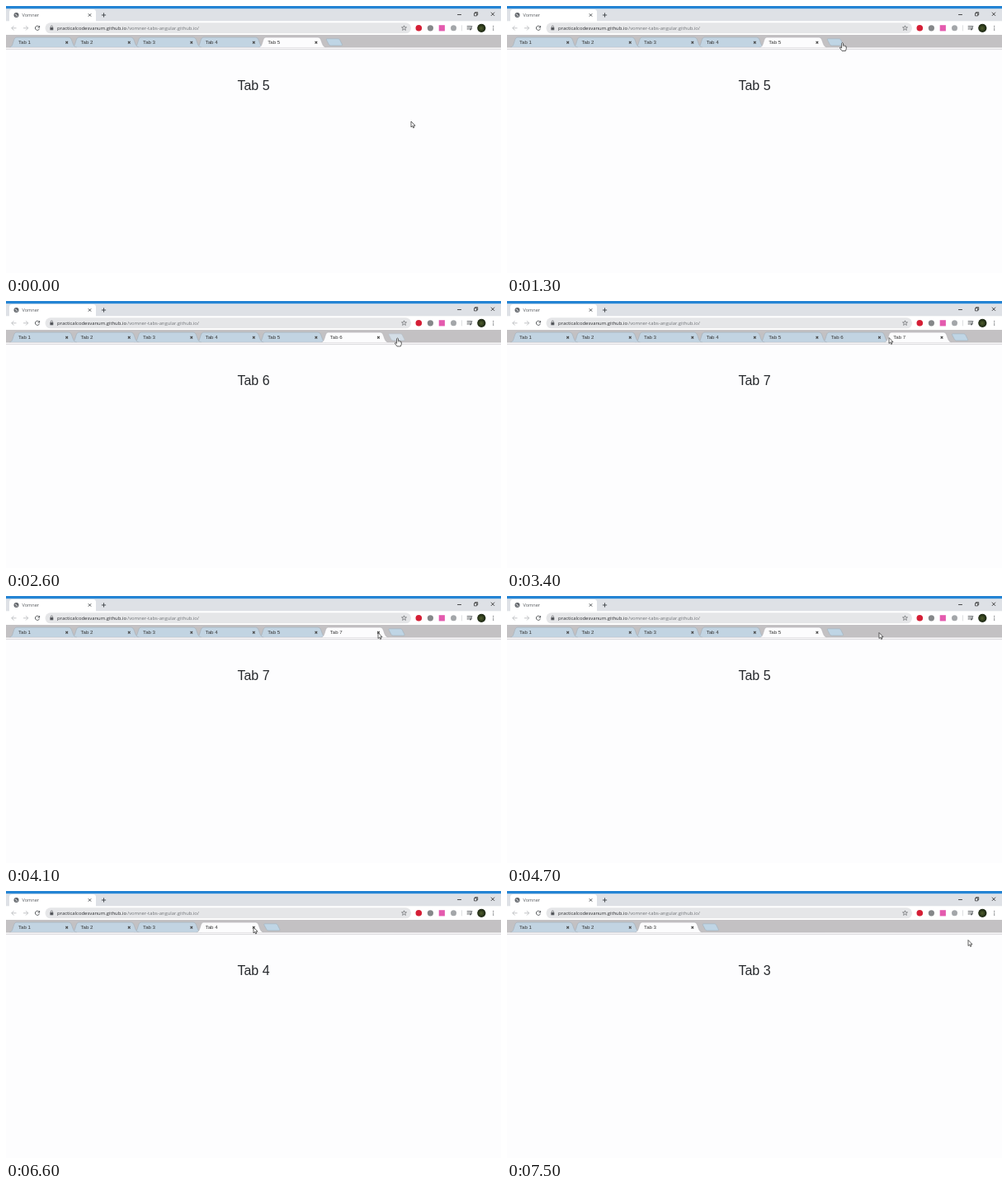
An HTML page with a canvas that plays this animation: 600x324 px, repeating every 7600 ms.

```html
<!DOCTYPE html>
<html lang="en">
<head>
<meta charset="utf-8">
<title>Dynamic tabs</title>
<style>
  html, body { margin: 0; width: 100%; height: 100%; overflow: hidden; background: #fdfdfe; }
  canvas { display: block; }
</style>
</head>
<body>
<canvas id="stage" width="600" height="324"></canvas>
<script>
const ctx = document.getElementById('stage').getContext('2d');
const LOOP = 7600, STEP = 100, PITCH = 75.55;
const UI = '"Open Sans", sans-serif';
const ARIAL = '"Liberation Sans", Arial, sans-serif';

// Open tabs from a given time on; the last one is active.
const tabStates = [
  [0, '12345'], [1600, '123456'], [3000, '1234567'],
  [4000, '123457'], [4500, '12345'], [5400, '1234'], [6700, '123']
];

// Pointer keys: time, x, y
const pointerPath = [
  [0, 491, 140], [100, 491, 140], [300, 461, 67], [500, 461, 67],
  [700, 413, 57], [800, 413, 57], [1200, 406.5, 44.5], [1800, 406.5, 44.5],
  [2500, 474.5, 45], [3000, 474.5, 45], [3400, 463, 44.5], [3600, 451, 44.5],
  [4700, 451, 44.5], [5200, 376, 44], [5500, 376, 44], [5900, 322.5, 45],
  [6000, 322.5, 45], [6400, 300, 44], [6700, 300, 44], [7300, 559, 59.5], [LOOP, 559, 59.5]
];
const handTimes = [[1000, 1600], [2300, 3000], [5700, 6200]];
const hoverTimes = [[2400, 3000], [5800, 6100]];

const within = (ranges, t) => ranges.some(([a, b]) => t >= a && t < b);

function pointerAt(t) {
  const i = pointerPath.findIndex(key => key[0] > t);
  const [t0, x0, y0] = pointerPath[i - 1], [t1, x1, y1] = pointerPath[i];
  const k = (t - t0) / (t1 - t0);
  return [x0 + (x1 - x0) * k, y0 + (y1 - y0) * k];
}

function rect(x, y, w, h, color) {
  ctx.fillStyle = color;
  ctx.fillRect(x, y, w, h);
}

function pill(x, y, w, h, r, color) {
  ctx.fillStyle = color;
  ctx.beginPath();
  ctx.roundRect(x, y, w, h, r);
  ctx.fill();
}

function disc(x, y, r, color) {
  ctx.fillStyle = color;
  ctx.beginPath();
  ctx.arc(x, y, r, 0, Math.PI * 2);
  ctx.fill();
}

function line(d, color, width = 0.8, x = 0, y = 0) {
  ctx.save();
  ctx.translate(x, y);
  ctx.strokeStyle = color;
  ctx.lineWidth = width;
  ctx.stroke(new Path2D(d));
  ctx.restore();
}

function shape(d, x, y, fill, stroke, width = 0.7) {
  ctx.save();
  ctx.translate(x, y);
  const path = new Path2D(d);
  ctx.fillStyle = fill;
  ctx.fill(path);
  ctx.strokeStyle = stroke;
  ctx.lineWidth = width;
  ctx.lineJoin = 'round';
  ctx.stroke(path);
  ctx.restore();
}

function text(value, x, y, font, color, align = 'left') {
  ctx.font = font;
  ctx.fillStyle = color;
  ctx.textAlign = align;
  ctx.fillText(value, x, y);
}

const cross = (x, y, r, color, width) =>
  line(`M${-r} ${-r}L${r} ${r}M${r} ${-r}L${-r} ${r}`, color, width, x, y);

function drawTitleBar() {
  rect(0, 0, 600, 3.5, '#2484d4');
  rect(0, 3.5, 600, 15, '#dee1e6');
  pill(4, 4, 105, 18, 3.5, '#fff');
  disc(12.5, 11, 3, '#5f6368');
  line('M-1.8 -.8Q0 -1.6 .2 .2T1.8 1M-.8 1.7L-.2 .8', '#fff', 0.7, 12.5, 11);
  text('Vomner', 19.5, 13, '5.6px ' + UI, '#55585c');
  cross(101.5, 11, 1.7, '#3c4043', 0.9);
  line('M-2.6 0H2.6M0 -2.6V2.6', '#3c4043', 0.9, 118.5, 11);
  line('M-2.4 0H2.4', '#222', 0.8, 549.5, 10.5);
  line('M-2 -1H1.2V2.2H-2ZM-1 -1V-2.1H2.2V1.1H1.2', '#222', 0.7, 569.5, 9.7);
  cross(590, 9.8, 2.1, '#222', 0.8);
}

function drawToolbar() {
  rect(0, 18.5, 600, 16.5, '#fff');
  line('M3 0H-2.7M0 -2.7L-2.7 0L0 2.7', '#b4b6b9', 0.8, 9.5, 26.8);
  line('M-3 0H2.7M0 -2.7L2.7 0L0 2.7', '#b4b6b9', 0.8, 24, 26.8);
  line('M2.3 -1.3A2.6 2.6 0 1 0 2.5 .8M2.6 -2.8V-.7H.5', '#4a4d51', 0.9, 38, 26.8);

  pill(47.5, 20.3, 443.5, 13, 6.5, '#e5e6e8');
  pill(53.4, 26, 3.9, 3.3, 0.4, '#55585c');
  line('M-1.1 0V-1A1.1 1.1 0 0 1 1.1 -1V0', '#55585c', 0.6, 55.35, 26);
  text('practicalcodesvanum.github.io', 62, 28.9, '5.9px ' + UI, '#2b2d30');
  text('/vomner-tabs-angular.github.io/', 147, 28.9, '5.84px ' + UI, '#707377');

  line('M0 -3L.8 -1H3L1.3 .4L1.9 2.6L0 1.3L-1.9 2.6L-1.3 .4L-3 -1H-.8Z', '#55585c', 0.6, 482.5, 26.8);
  disc(500.3, 26.8, 3.8, '#d51f36');
  disc(514.4, 26.8, 3.6, '#858789');
  rect(524.7, 23.2, 7.2, 7.2, '#e45aae');
  disc(542.5, 26.8, 3.5, '#a3a6a9');
  line('M0 -3.5V3.5', '#d0d2d5', 0.7, 552.5, 26.8);
  line('M-3.3 -2.3H2M-3.3 -.5H2M-3.3 1.3H-.5M3.3 -2.3H2.3V1.5', '#55585c', 0.8, 562, 26.8);
  disc(562.9, 28.3, 1.1, '#55585c');

  const avatar = ctx.createRadialGradient(576, 27, 0.5, 576, 26.8, 5.2);
  avatar.addColorStop(0, '#4b592b');
  avatar.addColorStop(1, '#172210');
  disc(576.3, 26.8, 5.1, avatar);
  [-2.2, 0, 2.2].forEach(dy => disc(590.7, 26.8 + dy, 0.65, '#55585c'));
}

function drawTab(index, label, active) {
  const x = 4 + PITCH * index;
  const color = active ? '#fcfcfd' : '#c2d4e2';
  shape('M0 50.3C3.5 49.7 4 46 5.2 42.5C6.3 39 7 38 9.5 38H71C73.8 38 74.8 39 76 42.5C77.3 46 78 49.7 82 50.3',
    x, 0, color, active ? '#b2b1b5' : '#9fabb6', 0.6);
  text('Tab ' + label, x + 11, 45.9, '6.1px ' + ARIAL, '#333');
  cross(x + 69.7, 44.3, 1.35, '#444', 1.05);
}

function drawTabBar(labels, hovered) {
  rect(0, 35, 600, 15.5, '#c3c1c3');
  const last = labels.length - 1;
  for (let i = last - 1; i >= 0; i--) drawTab(i, labels[i], false);
  line('M0 50.3H600', '#b0afb3', 0.6);
  drawTab(last, labels[last], true);
  rect(0, 50.5, 600, 2, '#f7f6f8');
  rect(0, 52.3, 600, 0.8, '#d2d1d4');
  shape('M1 39.8H14.5Q16 39.8 16.7 41.2L19.4 46.6Q20 48 18.5 48H5.5Q4 48 3.3 46.6L.5 41.2Q0 39.8 1 39.8Z',
    388 + PITCH * (last - 4), 0, hovered ? '#d3dde6' : '#bfd5e5', hovered ? '#b4bec8' : '#9fb0bd', 0.6);
}

function drawPointer(t) {
  const [x, y] = pointerAt(t);
  if (within(handTimes, t)) {
    shape('M-.9 .7Q0 -.5 .9 .7V3.4Q2 2.8 2.5 3.8Q3.4 3.4 3.8 4.3Q4.7 4.1 4.8 5.2V7.2L3.9 10H-.5L-2.8 6.8Q-3.4 5.6 -2.4 5.5L-.9 6.5Z',
      x, y, '#fff', '#222');
    line('M.9 3.6V5.3M2.5 4V5.5M3.8 4.5V5.8', '#555', 0.4, x, y);
  } else {
    shape('M0 0V7L1.6 5.6L2.7 8L3.8 7.5L2.8 5.2H5Z', x, y, '#fff', '#222');
  }
}

function draw(t) {
  const labels = tabStates.filter(state => state[0] <= t).pop()[1];
  rect(0, 0, 600, 324, '#fdfdfe');
  drawTitleBar();
  drawToolbar();
  drawTabBar(labels, within(hoverTimes, t));
  text('Tab ' + labels.at(-1), 300, 102, '16px ' + ARIAL, '#25282c', 'center');
  drawPointer(t);
}

function tick() {
  const t = performance.now() % LOOP;
  draw(Math.floor(t / STEP) * STEP);
  requestAnimationFrame(tick);
}
tick();
</script>
</body>
</html>
```
